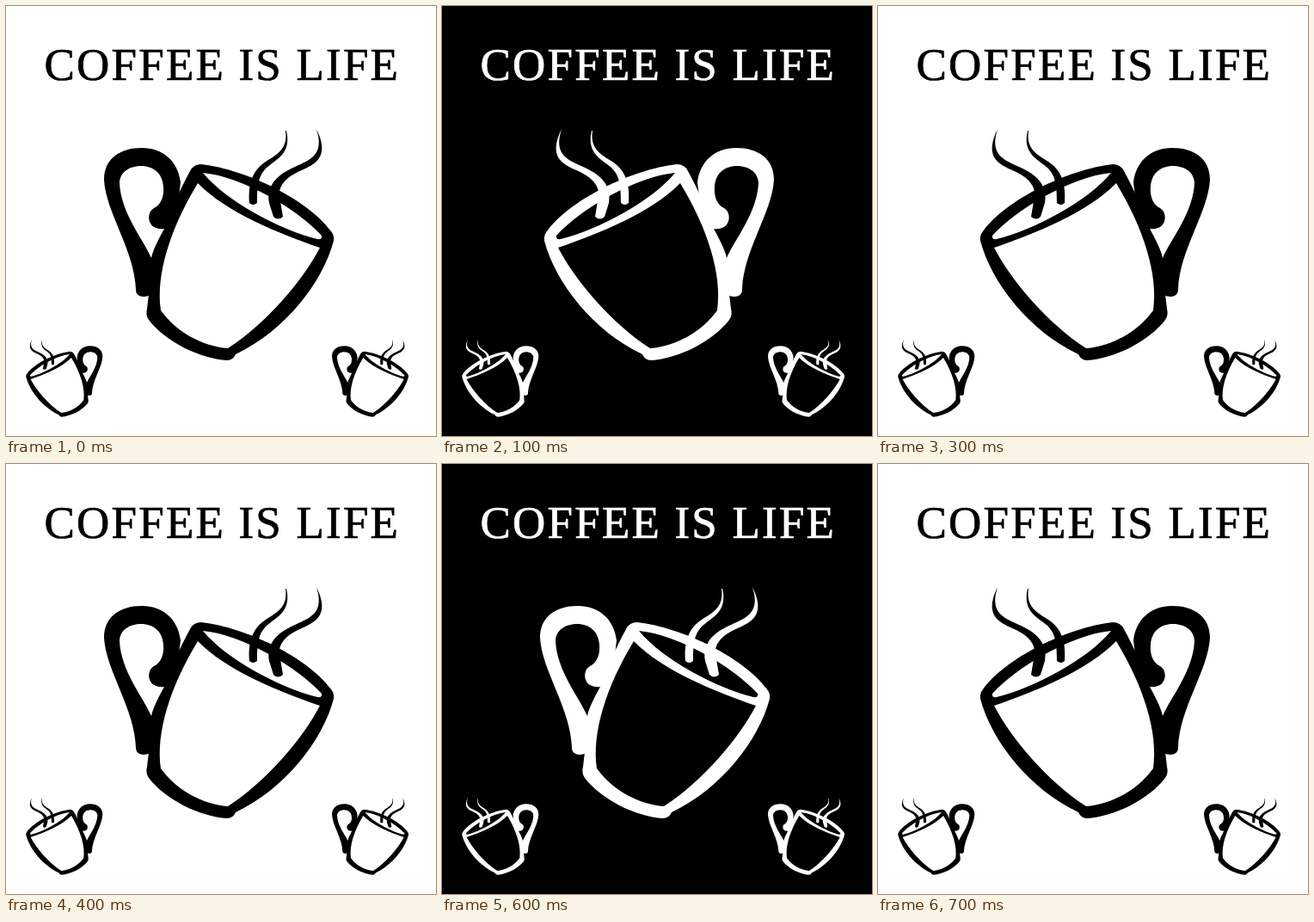
An HTML page with a canvas for the animation above (800 ms loop, 500 by 500 pixels).

```html
<!DOCTYPE html>
<html lang="en">
<head>
<meta charset="utf-8">
<title>Coffee is life</title>
<style>
  html, body { margin: 0; width: 100%; height: 100%; overflow: hidden; background: #fff; }
  canvas { display: block; width: 100vmin; height: 100vmin; }
</style>
</head>
<body>
<canvas id="stage" width="500" height="500"></canvas>
<script>
const ctx = document.getElementById('stage').getContext('2d');
const STEP = 100;

// Mug with its handle on the left; inner contours are cut out by even-odd fill.
const body = new Path2D(
  'M214 192 Q218 184 227 184 C280 190 352 226 378 262 Q382 267 381 273' +
  'C368 322 324 378 267 405 Q264 412 257 412 C225 410 185 390 166 365' +
  'Q162 359 164 352 L166 335 C172 290 190 235 214 192 Z' +
  'M229 194 C275 198 340 237 367 267 Q368 272 362 271 C318 260 256 227 229 194 Z' +
  'M223 206 C256 240 318 265 365 281 C346 318 302 370 258 398' +
  'C229 396 198 379 180 354 C174 312 191 259 223 206 Z');

const handle = new Path2D(
  'M114 202 C114 178 132 165 158 165 C182 165 200 180 203 205 L200 230 L178 300 L168 336' +
  'C160 340 151 338 151 330 C150 285 116 240 114 202 Z' +
  'M132 205 C133 192 145 186 157 186 C172 186 182 195 183 210' +
  'C184 222 180 230 174 234 C164 238 164 252 172 257 Q178 260 184 259' +
  'C178 270 171 283 169 293 C160 272 133 240 132 205 Z');

const steam = new Path2D(
  'M326 145 C331 166 321 175 308 184 C294 194 292 205 292 229 Q287 233 283 229' +
  'C281 205 288 190 302 181 C316 172 328 166 325 145 Z' +
  'M361 143 C375 172 364 182 346 190 C324 199 314 211 319 227 L322 245 Q316 250 311 245' +
  'L306 229 C302 207 318 195 336 187 C356 178 370 172 361 143 Z');

function mug(x, y, scale, flip) {
  ctx.save();
  ctx.translate(x, y);
  ctx.scale(flip ? -scale : scale, scale);
  for (const part of [handle, body, steam]) ctx.fill(part, 'evenodd');
  ctx.restore();
}

function title(color) {
  ctx.font = '53px "Liberation Serif", "Times New Roman", serif';
  ctx.letterSpacing = '2.2px';
  ctx.strokeStyle = color;
  ctx.lineWidth = 0.7;
  ctx.fillText('COFFEE IS LIFE', 44.5, 86);
  ctx.strokeText('COFFEE IS LIFE', 44.5, 86);
}

function draw(now) {
  const beat = Math.floor(now / STEP) % 4;
  const dark = beat === 1 || beat === 2;
  const flip = beat % 2 === 1;
  const ink = dark ? '#fff' : '#000';

  ctx.fillStyle = dark ? '#000' : '#fff';
  ctx.fillRect(0, 0, 500, 500);
  ctx.fillStyle = ink;
  title(ink);
  mug(flip ? 500 : 0, 0, 1, flip);
  mug(150.3, 340.3, 1 / 3, true);
  mug(341, 340.3, 1 / 3, false);
}

let start;
function loop(now) {
  start ??= now;
  draw(now - start);
  requestAnimationFrame(loop);
}
draw(0);
requestAnimationFrame(loop);
</script>
</body>
</html>
```
